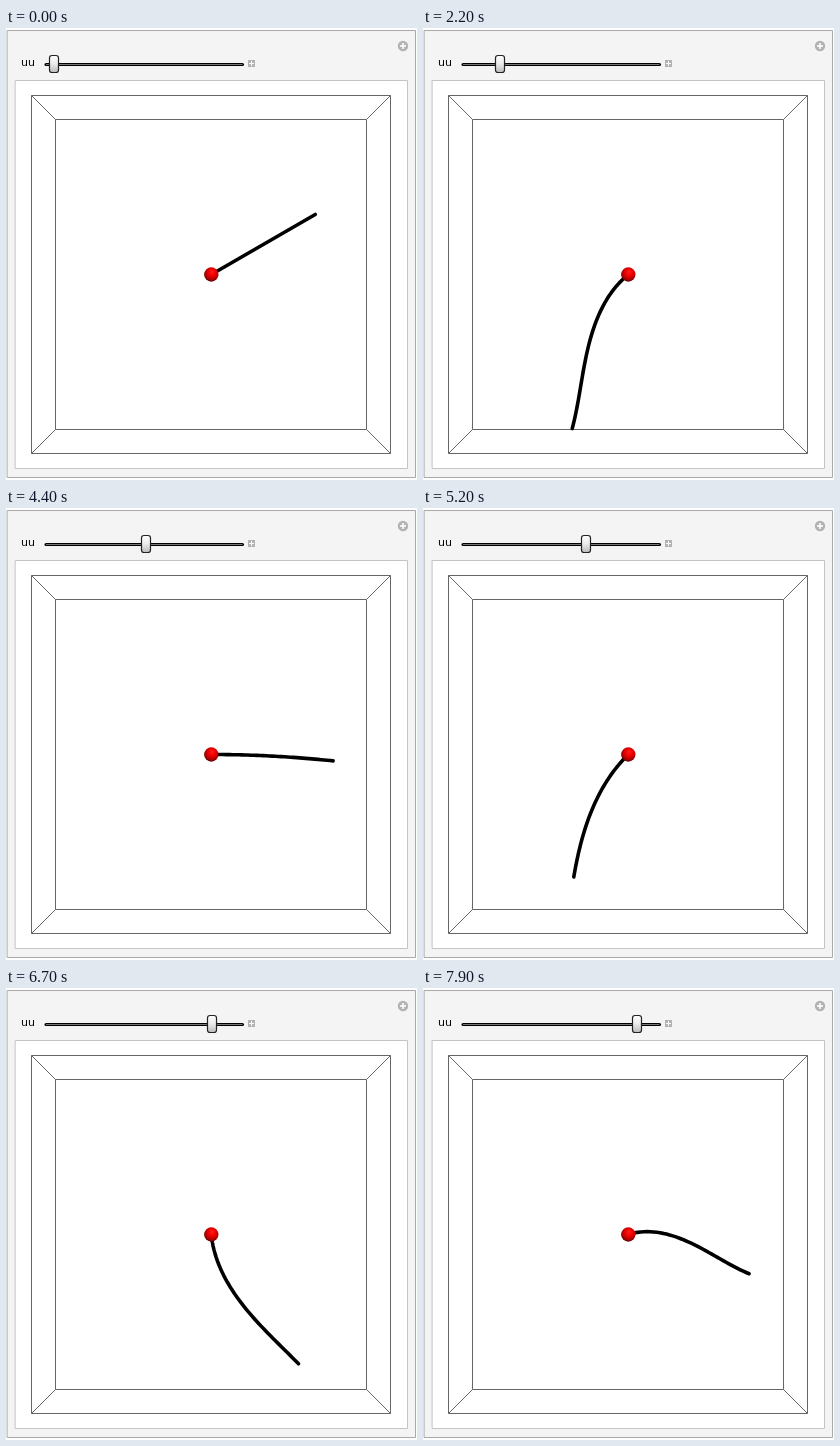
An HTML page with a canvas for the animation above (8 s loop, 411 px wide and 452 px high).

```html
<!DOCTYPE html>
<html lang="en">
<head>
<meta charset="utf-8">
<title>Swinging elastic rope</title>
<style>
  html, body { margin: 0; width: 100%; height: 100%; overflow: hidden; background: #fff; }
  canvas { display: block; }
</style>
</head>
<body>
<canvas id="stage" width="411" height="452"></canvas>
<script>
const ctx = document.getElementById('stage').getContext('2d');
const LOOP = 8000, HOLD = 1200, STEP = 100, LAST = 62;
const PIVOT = { x: 205.3, y: 246.5 };

// step, tip angle from straight down, tip distance
const swing = [
  [0, 120, 120], [4, 97, 120], [8, 21, 143], [10, -20, 164], [13, -57, 149], [16, -77, 130],
  [18, -73, 132], [21, -43, 124], [27, 45, 153], [30, 79, 130], [32, 87, 122], [36, 53, 129],
  [38, 18, 154], [40, -24, 134], [43, -66, 131], [46, -80, 138], [50, -42, 139], [54, 19, 164],
  [55, 34, 156], [58, 72, 127], [60, 87, 130], [62, 94, 127]
];

// step, extra angle at one third and at two thirds of the rope
const bends = [
  [0, 0, 0], [10, -15, -4.6], [16, 0, 0], [21, -4, 0], [24, -8, -3], [28, 8, 3],
  [32, 2, 1], [40, -13, -5.7], [46, 2, 1], [55, -15, -5.5], [58, 17, 5], [62, 2, 1]
];

function slope(keys, i, k) {
  const before = keys[i - 1], after = keys[i + 1];
  return before && after ? (after[k] - before[k]) / (after[0] - before[0]) : 0;
}

// Cubic Hermite interpolation between neighbouring keys
function sample(keys, step) {
  let i = 0;
  while (i < keys.length - 2 && keys[i + 1][0] <= step) i++;
  const a = keys[i], b = keys[i + 1], span = b[0] - a[0];
  const u = (step - a[0]) / span, v = 1 - u;
  return [1, 2].map(k =>
    v * v * (1 + 2 * u) * a[k] + u * u * (3 - 2 * u) * b[k] +
    span * u * v * (v * slope(keys, i, k) - u * slope(keys, i + 1, k)));
}

function stepAt(ms) {
  const n = Math.max(0, Math.floor((ms - HOLD) / STEP));
  return n > LAST ? 2 * LAST + 1 - n : n;
}

function box(x, y, w, h, stroke, fill) {
  if (fill) {
    ctx.fillStyle = fill;
    ctx.fillRect(x, y, w, h);
  }
  ctx.strokeStyle = stroke;
  ctx.lineWidth = 1;
  ctx.strokeRect(x, y, w, h);
}

function line(x1, y1, x2, y2, color, width, cap = 'butt') {
  ctx.strokeStyle = color;
  ctx.lineWidth = width;
  ctx.lineCap = cap;
  ctx.beginPath();
  ctx.moveTo(x1, y1);
  ctx.lineTo(x2, y2);
  ctx.stroke();
}

function disc(x, y, r, fill) {
  ctx.fillStyle = fill;
  ctx.beginPath();
  ctx.arc(x, y, r, 0, 2 * Math.PI);
  ctx.fill();
}

function plus(x, y, r, width) {
  line(x - r, y, x + r, y, '#fff', width);
  line(x, y - r, x, y + r, '#fff', width);
}

function drawPanel() {
  ctx.fillStyle = '#fff';
  ctx.fillRect(0, 0, 411, 452);
  box(1.5, 2.5, 408, 447, '#a9a9a9', '#f4f4f4');
  box(9.5, 52.5, 392, 388, '#c4c4c4', '#fff');
  disc(397, 18, 5.2, '#b3b3b3');
  plus(397, 18, 3, 1.6);

  box(25.5, 67.5, 359, 358, '#666');
  box(49.5, 91.5, 311, 310, '#666');
  for (const sx of [-1, 1])
    for (const sy of [-1, 1])
      line(205 + sx * 179.5, 246.5 + sy * 179, 205 + sx * 155.5, 246.5 + sy * 155, '#666', 1);
}

function drawSlider(step) {
  ctx.fillStyle = '#000';
  ctx.font = '11px "DejaVu Sans", sans-serif';
  ctx.fillText('uu', 15, 38);
  line(40, 36.5, 236.5, 36.5, '#000', 3, 'round');
  line(40, 36.5, 236.5, 36.5, '#777', 1);
  ctx.fillStyle = '#b3b3b3';
  ctx.fillRect(242, 32, 7, 7);
  plus(245.5, 35.5, 2.5, 1);

  const x = Math.round(48 + step * 2.87) - 4.5;
  const shade = ctx.createLinearGradient(0, 27, 0, 45);
  shade.addColorStop(0, '#fff');
  shade.addColorStop(.45, '#eee');
  shade.addColorStop(1, '#b8b8b8');
  ctx.fillStyle = shade;
  ctx.strokeStyle = '#222';
  ctx.lineWidth = 1.2;
  ctx.beginPath();
  ctx.roundRect(x, 27.5, 9, 17, 2.5);
  ctx.fill();
  ctx.stroke();
}

function drawRope(step) {
  const [tip, length] = sample(swing, step);
  const [bend1, bend2] = sample(bends, step);
  ctx.strokeStyle = '#000';
  ctx.lineWidth = 3.6;
  ctx.lineCap = ctx.lineJoin = 'round';
  ctx.beginPath();
  ctx.moveTo(PIVOT.x, PIVOT.y);
  for (let i = 1; i <= 40; i++) {
    const u = i / 40;
    // Parabola through the two bends, reaching zero at the tip
    const bend = bend1 * (3 * u - 2) * (3 * u - 3) / 2 - bend2 * (3 * u - 1) * (3 * u - 3);
    const angle = (tip + bend) * Math.PI / 180;
    ctx.lineTo(PIVOT.x + length * u * Math.sin(angle), PIVOT.y + length * u * Math.cos(angle));
  }
  ctx.stroke();
}

function drawBall() {
  const { x, y } = PIVOT;
  const shade = ctx.createRadialGradient(x + 1, y - 3, 0, x + .5, y - 1, 8.5);
  shade.addColorStop(0, '#ff1a1a');
  shade.addColorStop(.45, '#ee0000');
  shade.addColorStop(.8, '#a80000');
  shade.addColorStop(1, '#480000');
  disc(x, y, 7.2, shade);
}

const start = performance.now();
function tick() {
  const step = stepAt((performance.now() - start) % LOOP);
  drawPanel();
  drawSlider(step);
  drawRope(step);
  drawBall();
  requestAnimationFrame(tick);
}
tick();
</script>
</body>
</html>
```
